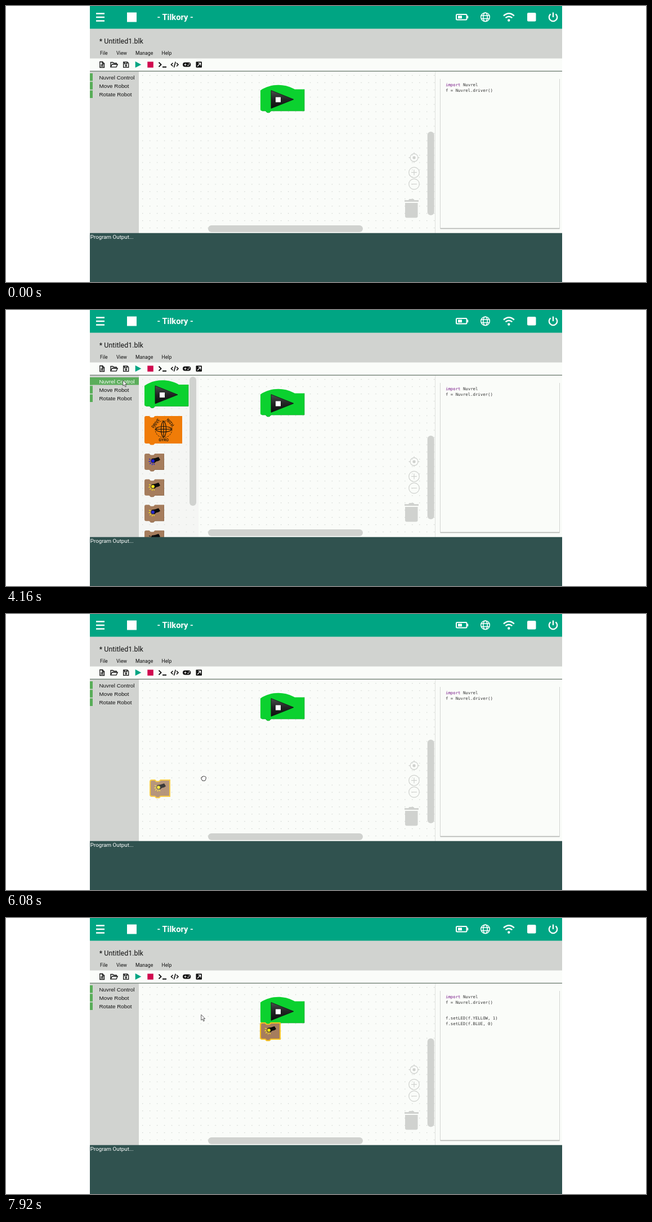
Recreate the animation shown at these times as an HTML page. Size 1137 by 492 pixels, loop 8 s.

```html
<!DOCTYPE html>
<html lang="en">
<head>
<meta charset="utf-8">
<title>Block editor</title>
<style>
html, body { margin: 0; width: 100%; height: 100%; overflow: hidden; background: #fff; }
svg { display: block; width: 100%; height: 100%; }
text { font-family: Roboto, sans-serif; white-space: pre; }
.side text { font: 9.85px "Liberation Sans", Arial, sans-serif; fill: #111; }
.code text { font: 7.33px "DejaVu Sans Mono", monospace; fill: #333; }
.menu text { font-size: 8.7px; fill: #111; }
.line { fill: none; stroke: #fff; }
.bar { fill: #d0d2cf; }
.zoom { fill: none; stroke: #cfd1ce; stroke-width: 1.2; }
.glow { fill: none; stroke: #f8c11d; stroke-width: 2; }
</style>
</head>
<body>
<svg viewBox="0 0 1137 492">
<defs>
  <pattern id="grid" x="236" y="117" width="12.95" height="12.95" patternUnits="userSpaceOnUse">
    <path d="M6 6.5h1.3" stroke="#ccd0cc" stroke-width="1.2"/>
  </pattern>
  <linearGradient id="dark" x2="0" y2="1">
    <stop offset="0" stop-color="#4a4d4c"/><stop offset=".5" stop-color="#222524"/><stop offset="1" stop-color="#0c0e0d"/>
  </linearGradient>
  <clipPath id="space"><path d="M236 117H762V405H236z"/></clipPath>
  <path id="peg" d="M0 3Q0 0 3 0H8.5l2.5 2.5h5L18.500 0H35V29H18.500l-2.500 2.500h-5L8.500 29H3Q0 29 0 26z"/>
  <path id="wide" d="M0 3Q0 0 3 0H8.500l2.500 2.500h5L18.500 0H67V49H18.500l-2.500 2.500h-5L8.500 49H3Q0 49 0 46z"/>
  <g id="start">
    <path d="M0 10c18-12.500 43-12.500 61-2H78V46.500H19l-3 3h-4l-3-3H3q-3 0-3-3z" fill="#0bd12f"/>
    <path d="M78 8V46.500H19l-3 3h-4l-3-3H3" fill="none" stroke="#08a926" stroke-width=".8"/>
    <path d="M19 10L59 26L19 42z" fill="url(#dark)" stroke="#111" stroke-width=".8"/>
    <rect x="27" y="22" width="9" height="9" fill="#fff"/>
  </g>
  <g id="torch">
    <use href="#peg" fill="#a67d5d"/>
    <path d="M34.500 1V28.500H18.500l-2.500 2.500h-5" fill="none" stroke="#8a6548" stroke-width=".7"/>
    <path d="M12.500 9l5 8 3.500-3 4-1 3-2-3-5-3 1-3 1z" fill="#0c0c0c"/>
    <circle cx="15" cy="13" r="3.300" style="fill:var(--bulb)" stroke="#111" stroke-width=".8"/>
    <path d="M11 10.500l-3-1M10.500 13.500l-3 .8M11.500 16l-2 2.500M14 17.500l-.5 3M16.500 17.500l1 2.500" fill="none" style="stroke:var(--ray)" stroke-width="1.300"/>
  </g>
  <g id="arrow" fill="#fff" stroke="#333" stroke-width=".8">
    <path d="M.3.3V10.200L2.600 8.100 4.300 12 6 11.200 4.300 7.500H7.200z"/>
  </g>
  <g id="open" fill="#fff" stroke="#222" stroke-width=".8">
    <path d="M-2 6L-5 1.500q0-1.500 2-.5L-4-3q1-1.500 2 0l1 2.500V-4.500q1-1.200 2 0V-.5L2-4q1.300-1 1.800.3L3.300 0 4.500-2q1.300-.3 1.200 1L4 6z"/>
  </g>
  <g id="fist" fill="#fff" stroke="#222" stroke-width=".9">
    <path d="M-2 4.200L-4 1V-1.500q1-1 1.500-.3 0-2.300 1.800-1.700Q.3-4.600 1.500-3.400q1.800-.4 1.900.9 1.100 0 .9 1.300Q4.200 2 2.500 4.200z"/>
  </g>
  <g id="spin" fill="none" stroke-width="2">
    <circle r="4.800" stroke="#3f8fe8"/>
    <path d="M-4.800 0A4.800 4.800 0 0 1-1-4.700" stroke="#9fd0f5"/>
  </g>
</defs>

<!-- Header -->
<path d="M149 0H988V492H149z" fill="#fafcf9"/>
<path d="M149 40H988V93.500H149z" fill="#d1d3d0"/>
<path d="M149 0H988V40.500H149z" fill="#00a583"/>
<path d="M160 13.500h15M160 20h15M160 26.500h15" class="line" stroke-width="2.300"/>
<rect x="215" y="11.500" width="17" height="17" fill="#fff"/>
<text x="268.500" y="25" font-size="14.700" font-weight="700" fill="#fff">- Tilkory -</text>
<g class="line" stroke-width="2">
  <rect x="800" y="15" width="18.500" height="9.500" rx="1.500"/>
  <path d="M820 17.500v4.500" stroke-width="2.500"/>
  <path d="M803 19.750h7" stroke-width="5"/>
  <g stroke-width="1.500">
    <circle cx="851.500" cy="19.800" r="7.800"/><ellipse cx="851.500" cy="19.800" rx="3.700" ry="7.800"/>
    <path d="M844 17h15M844 22.600h15"/>
  </g>
  <path d="M884 17.500q9.300-8.300 18.800 0M887.500 21.200q5.800-5 11.800 0" stroke-width="2.400"/>
  <circle cx="893.300" cy="25.500" r="2.200" fill="#fff" stroke="none"/>
  <rect x="926" y="12" width="15.500" height="15.500" rx="2" fill="#fff" stroke="none"/>
  <path d="M967.500 14.300a7.200 7.200 0 1 0 9 0M972 11.500v8.500" stroke-width="2.300"/>
</g>
<text x="165.800" y="67" font-size="12.500" fill="#111">* Untitled1.blk</text>
<g class="menu">
  <text x="167" y="87">File</text><text x="196" y="87">View</text>
  <text x="230" y="87">Manage</text><text x="276.500" y="87">Help</text>
</g>

<!-- Toolbar -->
<g fill="none" stroke="#111" stroke-width="1.300">
  <path d="M166.800 99.500h4.700l3 3v7h-7.700zM171 99.500v3.500h3.500M168.500 105h4.500M168.500 107.200h4.500"/>
  <path d="M186 108.500v-8h4l1.300 1.500h5v2M186 108.800l2.500-4.800h9.700l-2.200 4.800z"/>
  <path d="M208.700 100h7l2 2v7.300h-9zM210.500 100v3h4.500v-3"/><circle cx="213.200" cy="106.300" r="1.200"/>
  <path d="M271.500 100.500l4 3.900-4 4M278 108.800h7" stroke-width="1.900"/>
  <path d="M296.500 101.500l-3 3 3 3M303 101.500l3 3-3 3M301.200 99.500l-2.800 10" stroke-width="1.600"/>
</g>
<path d="M229.700 98.800L240.300 104.400 229.700 110z" fill="#00a583"/>
<rect x="251.300" y="99.300" width="10.500" height="10.500" fill="#d00a4e"/>
<rect x="314" y="100.500" width="14.300" height="8" rx="4" fill="#111"/>
<path d="M316.500 104.500h4M318.500 102.500v4" stroke="#fff"/>
<circle cx="323.500" cy="105.700" r="1" fill="#fff"/><circle cx="325.600" cy="103.300" r="1" fill="#fff"/>
<rect x="337.500" y="99.300" width="10.500" height="10.500" rx="1" fill="#111"/>
<path d="M340 107.500l5-5M341.500 101.700h4.200v4.200" fill="none" stroke="#fff" stroke-width="1.300"/>

<!-- Workspace -->
<path d="M236 117H762V405H236z" fill="url(#grid)"/>
<path d="M762.500 117V405" stroke="#dfe1de"/>
<g class="zoom">
  <circle cx="725" cy="270.300" r="7"/><circle cx="725" cy="270.300" r="2" fill="#cfd1ce"/>
  <path d="M725 261v3M725 276.500v3M715.500 270.300h3M731.500 270.300h3"/>
  <circle cx="725" cy="296.700" r="9.300"/><path d="M720 296.700h10M725 291.700v10"/>
  <circle cx="725" cy="317.500" r="9.300"/><path d="M720 317.500h10"/>
</g>
<path d="M708 349v-3h7l1.500-2h7.500l1.500 2h7.500v3zM709 351h22.500v23.500q0 3-3 3h-16.500q-3 0-3-3z" class="bar"/>
<rect id="vbar" class="bar" x="748.700" width="12" rx="6"/>
<rect id="hbar" class="bar" y="391" height="12" rx="6"/>
<use href="#start" x="452" y="140.500"/>

<g id="flyout" clip-path="url(#space)">
  <path d="M236 117H342V405H236z" fill="#e8e8e6" opacity=".3"/>
  <use href="#start" x="246" y="125"/>
  <g transform="translate(246 189)">
    <use href="#wide" fill="#f07c08"/>
    <use id="wideGlow" href="#wide" class="glow"/>
    <g fill="none" stroke="#16120c" stroke-width="1.200">
      <circle cx="34" cy="23.500" r="15" stroke-width=".8" stroke-dasharray="3 1.500"/>
      <ellipse cx="34" cy="23.500" rx="14" ry="5"/><ellipse cx="34" cy="23.500" rx="4.500" ry="14"/>
      <path d="M20 23.500h28M34 9.500v28"/>
    </g>
    <g font-size="6.800" font-weight="500" text-anchor="middle" fill="#16120c">
      <text transform="translate(21.500 14.500) rotate(-52)">DRIVE</text>
      <text transform="translate(44 13) rotate(48)">WITH</text>
      <text x="34" y="45">GYRO</text>
    </g>
  </g>
  <use href="#torch" x="246" y="256" style="--bulb:#1a1ad8;--ray:#1a1ad8"/>
  <use href="#torch" x="246" y="301.700" style="--bulb:#ffe81a;--ray:#ffe81a"/>
  <use href="#torch" x="246" y="347.300" style="--bulb:#2a2ad0;--ray:#ffe81a"/>
  <use href="#torch" x="246" y="393" style="--bulb:#111;--ray:#111"/>
  <use id="pegGlow" href="#peg" x="246" class="glow"/>
  <rect class="bar" x="326" y="119" width="12" height="230" rx="6"/>
</g>

<!-- Side list -->
<g class="side">
  <path d="M149 117H236V405H149z" fill="#d1d3d0"/>
  <path d="M149 120h5v13.500h-5zM149 135.300h5v13.500h-5zM149 150.600h5v13.500h-5z" fill="#58ad58"/>
  <path id="pick" d="M149 120H236V133.500H149z" fill="#5bad5b"/>
  <text id="pickText" x="165.500" y="130.500">Nuvrel Control</text>
  <text x="165.500" y="146">Move Robot</text>
  <text x="165.500" y="161.300">Rotate Robot</text>
</g>
<path d="M149 116.300H988" stroke="#7d8a80" stroke-width="1.600"/>

<!-- Code panel -->
<path d="M771.500 130V396.500H983.500V130" fill="none" stroke="#d3d5d2"/>
<path d="M771.500 396.700H983.500" stroke="#b9bbb8" stroke-width="1.800"/>
<g class="code">
  <text x="781" y="143"><tspan fill="#7a1c8a">import</tspan> Nuvrel</text>
  <text x="781" y="152.500">f = Nuvrel.driver()</text>
  <g id="added">
    <text x="781" y="181">f.setLED(f.YELLOW, 1)</text>
    <text x="781" y="190.500">f.setLED(f.BLUE, 0)</text>
  </g>
</g>

<path d="M149 404.700H988V492H149z" fill="#30524f"/>
<text x="149.800" y="415.300" font-size="9.750" fill="#fff">Program Output...</text>

<g id="block" style="--bulb:#ffe81a;--ray:#ffe81a">
  <use href="#torch"/><use href="#peg" class="glow"/>
</g>
<use id="cursor"/>
</svg>

<script>
const LOOP = 8000, STEP = 80;
const el = id => document.getElementById(id);

// [time, x, y]
const cursorPath = [
  [240, 366, 118], [320, 366, 118],
  [2400, 527.5, 470], [2480, 470, 432], [2640, 336, 348], [2880, 336, 348],
  [3040, 227, 177], [3280, 227, 177], [3600, 207.5, 125], [4480, 207.5, 125],
  [4720, 288, 202], [5040, 285, 268], [5120, 285, 268], [5520, 277, 325],
  [5920, 277, 325], [6080, 351, 293], [6320, 440, 257], [6480, 440, 257],
  [6720, 481, 231], [7200, 482, 219], [7760, 482, 219], [7920, 346.5, 172]
];
const blockPath = [
  [6000, 246, 302], [6080, 256, 296], [6160, 319, 268], [6320, 408, 232],
  [6480, 408, 232], [6720, 449, 206], [7200, 450, 194], [7280, 450, 194], [7360, 452, 187]
];
// [time, shape] from that time on
const shapes = [
  [0, ""], [240, "arrow"], [320, ""], [2400, "spin"], [2480, "arrow"],
  [4640, "open"], [5840, "fist"], [7360, "open"], [7840, "arrow"]
];

function along(path, t) {
  const i = path.findIndex(k => k[0] > t);
  if (i < 0) return path[path.length - 1].slice(1);
  if (i === 0) return path[0].slice(1);
  const [t0, x0, y0] = path[i - 1], [t1, x1, y1] = path[i];
  const p = (t - t0) / (t1 - t0);
  return [x0 + (x1 - x0) * p, y0 + (y1 - y0) * p];
}

const within = (t, from, to) => t >= from && t < to;
const show = (id, on) => el(id).style.display = on ? "" : "none";
const place = (id, [x, y]) => el(id).setAttribute("transform", `translate(${x} ${y})`);

function span(id, pos, size, from, to) {
  el(id).setAttribute(pos, from);
  el(id).setAttribute(size, to - from);
}

function draw(t) {
  const menu = within(t, 4160, 6000);
  show("flyout", menu);
  show("pick", menu);
  el("pickText").style.fill = menu ? "#fff" : "";
  show("wideGlow", within(t, 4640, 4880));
  show("pegGlow", t >= 4960);
  el("pegGlow").setAttribute("y", t < 5360 ? 256 : 301.7);

  const loose = within(t, 6240, 7360);
  span("vbar", "y", "height", ...(loose ? [183, 351] : t < 6240 ? [224, 373] : [214.5, 372.5]));
  span("hbar", "x", "width", ...(loose ? [392, 728] : [359, 634]));
  show("added", t >= 6240);

  show("block", t >= 6000);
  el("block").style.opacity = t < 7360 ? 0.8 : 1;
  place("block", along(blockPath, t));

  const shape = shapes.filter(s => s[0] <= t).pop()[1];
  show("cursor", shape);
  el("cursor").setAttribute("href", "#" + shape);
  place("cursor", along(cursorPath, t));
}

const begin = performance.now();
function tick() {
  const t = (performance.now() - begin) % LOOP;
  draw(t - t % STEP);
  requestAnimationFrame(tick);
}
tick();
</script>
</body>
</html>
```
